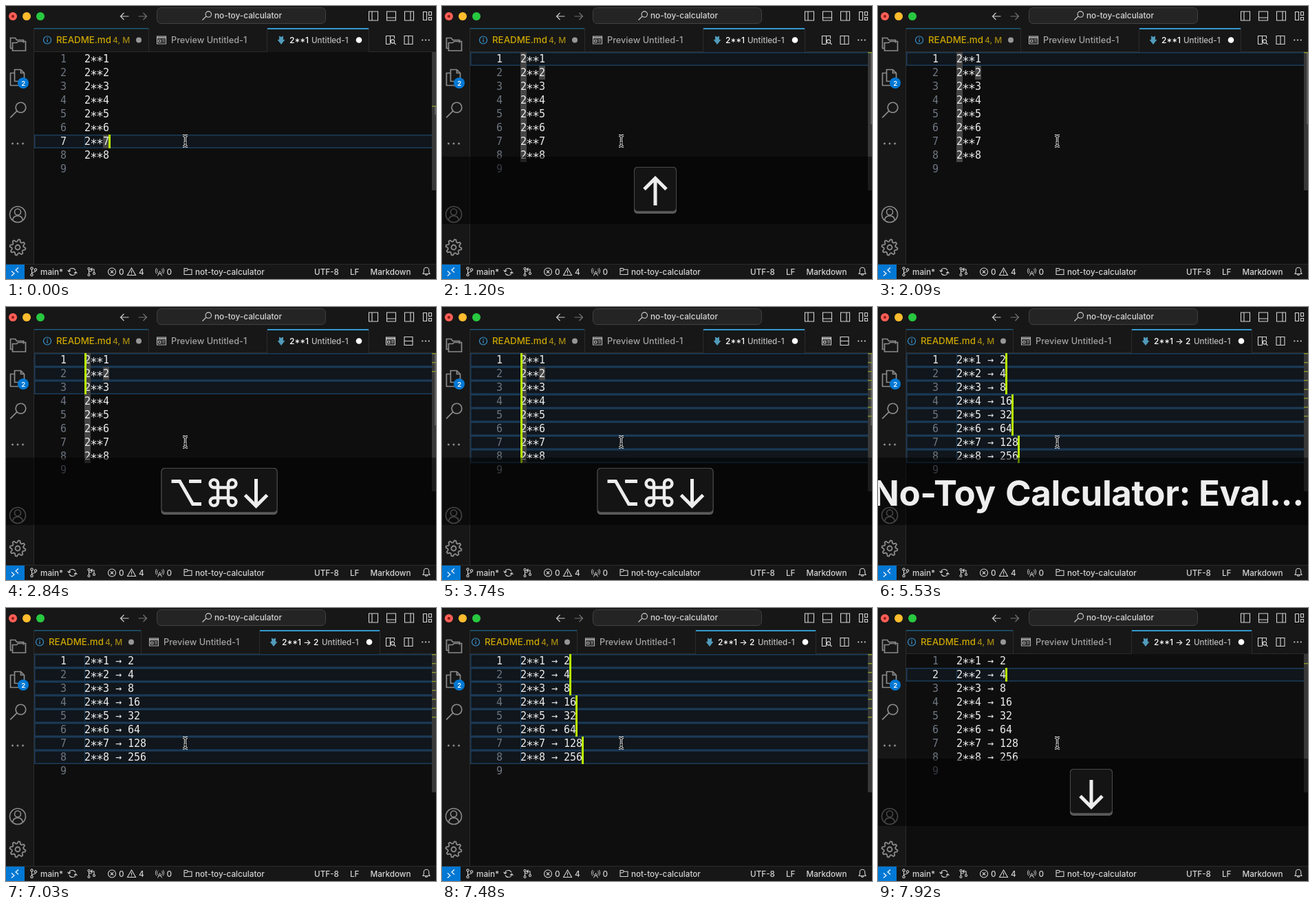
An HTML page with a canvas for the animation above (8 s loop, 625 px wide and 397 px high).

```html
<!DOCTYPE html>
<html lang="en">
<head>
<meta charset="utf-8">
<title>Editor</title>
<style>
html, body { margin: 0; width: 100%; height: 100%; overflow: hidden; background: #0e0e0e; }
canvas { display: block; width: 625px; height: 397px; }
</style>
</head>
<body>
<canvas id="stage" width="625" height="397"></canvas>
<script>
const ctx = document.getElementById('stage').getContext('2d');
const LOOP = 8000, TOP = 67, ROW = 20, LEFT = 114, CELL = 9;
const UI = 'Inter, "Noto Sans", sans-serif';
const MONO = '"DejaVu Sans Mono", "Noto Sans Mono", monospace';
const BAR = '#171717', EDITOR = '#0e0e0e', EDGE = '#2b2b2b', TEXT = '#d4d4d4', LIME = '#b9f500', BLUE = '#0078d4';
const LABEL = 'label';

// Each step changes part of the state: rows first..last hold carets.
const steps = [
  [0, { first: 7, last: 7, end: true, on: true, mark: 'last', key: '', alt: false, done: false }],
  [150, { on: false }],
  [450, { key: '↑', first: 6, last: 6, on: true, mark: '' }],
  [600, { first: 1, last: 1, end: false }],
  [900, { mark: 'twos' }],
  [1200, { on: false }],
  [1500, { key: '' }],
  [1640, { on: true }],
  [2090, { on: false }],
  [2540, { on: true, alt: true }],
  [2690, { key: '⌥⌘↓', last: 2 }],
  [2840, { last: 3 }],
  [2990, { last: 4 }],
  [3290, { last: 5 }],
  [3440, { last: 6 }],
  [3590, { last: 7 }],
  [3740, { last: 8 }],
  [4040, { alt: false }],
  [4190, { key: '⌘→', end: true, mark: '' }],
  [4630, { mark: 'first' }],
  [4930, { on: false }],
  [5380, { key: LABEL, on: true }],
  [5530, { done: true, mark: '' }],
  [6130, { on: false }],
  [6280, { key: '' }],
  [6580, { on: true }],
  [7030, { on: false }],
  [7480, { on: true }],
  [7630, { key: '⎋', last: 1 }],
  [7920, { key: '↓', first: 2, last: 2 }]
];

function stateAt(t) {
  const s = {};
  for (const [at, change] of steps) if (at <= t) Object.assign(s, change);
  return s;
}

function box(x, y, w, h, color) {
  ctx.fillStyle = color;
  ctx.fillRect(x, y, w, h);
}

function disc(x, y, r, color) {
  ctx.fillStyle = color;
  ctx.beginPath();
  ctx.arc(x, y, r, 0, 7);
  ctx.fill();
}

function panel(x, y, w, h, r, fill, line) {
  ctx.beginPath();
  ctx.roundRect(x, y, w, h, r);
  ctx.fillStyle = fill;
  ctx.fill();
  if (line) {
    ctx.strokeStyle = line;
    ctx.lineWidth = 1;
    ctx.stroke();
  }
}

function text(str, x, y, size, color = TEXT, weight = 450, family = UI) {
  ctx.font = `${weight} ${size}px ${family}`;
  ctx.fillStyle = color;
  ctx.fillText(str, x, y);
}

function icon(path, x = 0, y = 0, color = TEXT, width = 1.1) {
  ctx.save();
  ctx.translate(x, y);
  ctx.strokeStyle = color;
  ctx.lineWidth = width;
  ctx.stroke(new Path2D(path));
  ctx.restore();
}

const ring = r => `M${r} 0A${r} ${r} 0 1 1 ${-r} 0A${r} ${r} 0 1 1 ${r} 0Z`;
const frame = 'M-6.5 -6.5H6.5V6.5H-6.5Z';
const lens = r => `M${r} ${-r * .3}a${r * .65} ${r * .65} 0 1 1 ${-r * 1.3} 0a${r * .65} ${r * .65} 0 1 1 ${r * 1.3} 0M${-r * .14} ${r * .14}L${-r} ${r}`;
const folder = 'M-5.5 4.5V-4.5H-1.5L0 -2.8H5.5V4.5ZM-5.5 -1H-1.5L0 -2.8';
const preview = 'M-6.5 -5.5H6.5V5.5H-6.5ZM-6.5 -2.5H6.5M-6.5 -4H6.5M-4.5 0H-1V3H-4.5ZM1 0H5M1 2.5H5';

function dots(x, y, gap, r, color) {
  for (let i = -1; i <= 1; i++) disc(x + i * gap, y, r, color);
}

function titleBar() {
  box(0, 0, 625, 32, BAR);
  disc(10, 15, 6, '#ff5f57');
  disc(10, 15, 2, '#8c1a12');
  disc(30, 15, 6, '#febc2e');
  disc(50, 15, 6, '#28c840');
  const back = 'M6 0H-6M-1 -5L-6 0L-1 5', next = 'M-6 0H6M1 -5L6 0L1 5';
  icon(back, 172.5, 15, '#cccccc', 1.2);
  icon(next, 198.5, 15, '#747474', 1.2);
  panel(219.5, 2.5, 245, 23, 6, '#242424', '#424242');
  icon(lens(6.5), 292, 14);
  text('no-toy-calculator', 303, 18, 11.8);
  icon(frame + 'M-2 -6.5V6.5', 534, 14.5);
  icon(frame + 'M-6.5 2.5H6.5', 560, 14.5);
  icon(frame + 'M2 -6.5V6.5', 586, 14.5);
  icon('M-6 -6H-1V6H-6ZM2 -6H6V-1H2ZM2 2H6V6H2Z', 612.5, 14.5);
}

function tabs(s) {
  const shift = s.done ? -11 : 0;
  const active = 379 + shift, close = s.done ? 543 : 527;
  box(41, 32, 584, 35, BAR);
  box(41, 66, 584, 1, EDGE);
  box(active, 32, close - active, 35, BAR);
  box(active, 32, close - active, 2, '#3399cc');
  box(41, 32, 166 + shift, 1.5, '#1f5878');
  for (const x of [207 + shift, active, close]) box(x, 32, 1, 35, EDGE);

  ctx.save();
  ctx.translate(shift, 0);
  icon(ring(5.5), 60, 49.5, '#3794cf', 1.2);
  box(59.4, 48.5, 1.3, 4, '#3794cf');
  box(59.4, 46, 1.3, 1.4, '#3794cf');
  text('README.md', 73, 54, 13.3, '#cca700');
  text('4, M', 155, 54, 12, '#a58a10');
  disc(193, 49.5, 4, '#969696');
  icon(preview, 226, 49.5, '#b8b8b8');
  text('Preview Untitled-1', 240, 54, 12.7, '#a3a3a3');
  ctx.translate(active - 379 - shift, 0);
  ctx.fillStyle = '#519aba';
  ctx.fill(new Path2D('M397 43.5L400 45L403 43.5V49H405.5L400 56L394.5 49H397Z'));
  text(s.done ? '2**1 → 2' : '2**1', 412, 54, 12, '#ffffff', 500);
  ctx.restore();

  const tail = s.done ? 15 : 0;
  text('Untitled-1', 444 + tail, 54, 11.6, '#bcbcbc');
  disc(513 + tail, 49.5, 4.3, '#ffffff');

  if (s.alt) {
    icon(preview, 559, 49.5);
    icon('M-6 -6H6V6H-6ZM-6 0H6', 585, 49.5);
  } else {
    icon('M0 6H-6V-6H6V-2M0 -6V6', 558.5, 49.5);
    icon(ring(2.6) + 'M2 2L4.5 4.5', 562, 51.5);
    icon('M-6 -6H6V6H-6ZM0 -6V6', 585, 49.5);
  }
  dots(610, 49.5, 4.7, 1.1, TEXT);
}

function activityBar() {
  const grey = '#8b8b8b';
  box(0, 32, 41, 344, BAR);
  box(40, 32, 1, 344, EDGE);
  icon('M-8 6H-11V-9H-4L-2 -6H8V-2M-8 9.5V-2H-2L0 -4H11V9.5Z', 17.5, 55.5, grey, 1.7);
  icon('M-4 -11H5L10 -6V6H-4ZM5 -11V-6H10M-4 -6H-10V12H4V6', 16.5, 103.5, grey, 1.7);
  disc(25, 112, 8, BLUE);
  text('2', 22.3, 115.7, 9.5, '#ffffff', 600);
  icon(lens(11.3), 17.5, 151, grey, 1.7);
  dots(17, 200, 7.5, 1.5, grey);
  icon(ring(11.5), 17, 303, grey, 1.6);
  icon(ring(4.5), 17, 299.5, grey, 1.6);
  icon('M-7.5 8.5C-6 0 6 0 7.5 8.5', 17, 303, grey, 1.6);

  let gear = '';
  for (let i = 0; i < 32; i++) {
    const a = (i + .5) * Math.PI / 16, r = i % 4 < 2 ? 11.5 : 8.5;
    gear += `${i ? 'L' : 'M'}${r * Math.cos(a)} ${r * Math.sin(a)}`;
  }
  icon(gear + 'Z', 17, 351, grey, 1.8);
  icon(ring(3.5), 17, 351, grey, 1.8);
}

function statusBar() {
  box(0, 375, 625, 22, BAR);
  box(0, 375, 625, 1, EDGE);
  box(0, 376, 27, 21, BLUE);
  icon('M-5 -1L-1 2.5L-5 6M5 -6L1 -2.5L5 1', 13, 386.5, '#ffffff', 1.1);
  icon(ring(1.7), 37.5, 381.5);
  icon(ring(1.7), 37.5, 391);
  icon(ring(1.7), 43, 383.5);
  icon('M37.5 383V389.3M43 385C43 388 38 386 37.5 389');
  icon('M-5 -1A5 5 0 0 1 4.5 -2M5 1A5 5 0 0 1 -4.5 2M-7 -2.5L-5 0L-2.5 -2M7 2.5L5 0L2.5 2', 96.5, 386.5);
  for (const y of [382, 391]) icon(ring(1.5), 120.5, y);
  icon(ring(1.5), 128, 389);
  icon('M120.5 383.5V389.5M128 387.5V383H123M125.5 381L123 383L125.5 385M120.5 386H124.5');
  icon(ring(5.5) + 'M-2.2 -2.2L2.2 2.2M2.2 -2.2L-2.2 2.2', 154, 386.5);
  icon('M0 -5.5L6 5H-6ZM0 -2V2M0 3V4', 182.5, 386.5);
  icon('M0 -1L-3 6M0 -1L3 6M-2 3H2M-2.6 -4A3.5 3.5 0 0 0 -2.6 1.5M2.6 -4A3.5 3.5 0 0 1 2.6 1.5M-4.5 -5.5A6.5 6.5 0 0 0 -4.5 3M4.5 -5.5A6.5 6.5 0 0 1 4.5 3', 223.5, 386.5, TEXT, .9);
  icon(folder, 264.5, 386);
  const labels = [['main*', 50], ['0', 164], ['4', 193], ['0', 233.5], ['not-toy-calculator', 275],
    ['UTF-8', 448], ['LF', 500], ['Markdown', 529.5]];
  for (const [str, x] of labels) text(str, x, 390.5, 11.7);
  icon('M-5 3.5H5L3.7 1V-2A3.7 3.7 0 0 0 -3.7 -2V1ZM-1.5 4A1.5 1.5 0 0 0 1.5 4', 611, 386);
}

// Asterisks are large and sit at mid height, as in a coding font.
function codeLine(str, row) {
  const base = TOP + row * ROW - 5;
  [...str].forEach((c, i) => {
    const star = c === '*';
    text(c, LEFT + i * CELL - (star ? .7 : 0), base + (star ? 4 : 0), star ? 17.5 : 15, '#ececec', 400, MONO);
  });
}

function editor(s) {
  const has = row => row >= s.first && row <= s.last;
  const line = row => `2**${row}` + (s.done ? ` → ${2 ** row}` : '');
  box(41, 67, 584, 308, EDITOR);

  for (let row = 1; row <= 8; row++) {
    const y = TOP + (row - 1) * ROW;
    if (has(row)) {
      box(41, y, 584, ROW, '#10161b');
      ctx.strokeStyle = '#1b3a57';
      ctx.lineWidth = 1.6;
      ctx.strokeRect(41.8, y + .8, 590, ROW - 1.6);
      box(LEFT, y, 1, ROW, '#1b3a57');
    }
    const twos = s.mark === 'twos';
    if (twos) box(LEFT, y, CELL, ROW, '#454545');
    if (twos && row === 2 || s.mark === 'last' && row === 7 || s.mark === 'first' && row === 1)
      box(LEFT + 3 * CELL, y, CELL, ROW, '#454545');
  }

  for (let row = 1; row <= 9; row++) {
    const lead = row === s.first;
    text(row, 79, TOP + row * ROW - 5, 15, lead ? '#e6e6e6' : '#6e7681', 400, MONO);
    if (row > 8) continue;
    const str = line(row);
    codeLine(str, row);
    if (s.on && has(row))
      box(s.end ? LEFT + str.length * CELL - 1 : LEFT, TOP + (row - 1) * ROW, 3, ROW, LIME);
  }

  // Overview ruler
  box(619, 67, 6, 201, '#383838');
  if (s.mark === 'twos') box(623, 67, 2, 105, '#5c5c5c');
  if (s.mark === 'last') box(623, 146, 2, 12, '#5c5c5c');
  if (s.mark === 'first') box(623, 67, 2, 12, '#5c5c5c');
  for (let row = s.first; row <= s.last; row++) box(619, 67 + (row - 1) * 13, 6, 1.5, '#7f962c');
}

const arrow = 'M0 -20V19M-16 3.5L0 19.5L16 3.5';
const turn = { '↓': 0, '↑': Math.PI, '→': -Math.PI / 2 };
const advance = { '⌥': 55, '⌘': 52, '⎋': 52, '→': 52 };
const keyWidth = c => advance[c] || 44;

function symbol(c, x) {
  const color = '#ededed';
  ctx.save();
  ctx.translate(x, 270);
  if (c in turn) {
    ctx.rotate(turn[c]);
    icon(arrow, 0, 0, color, 5);
  } else if (c === '⌥') {
    icon('M-21.5 -16.5H-9.5L9.5 16.5H22M4 -16.5H22', 0, 0, color, 4.8);
  } else if (c === '⌘') {
    icon('M-7.5 -7.5H7.5V7.5H-7.5ZM-7.5 -7.5H-13A5.7 5.7 0 1 1 -7.5 -13ZM7.5 -7.5V-13A5.7 5.7 0 1 1 13 -7.5ZM7.5 7.5H13A5.7 5.7 0 1 1 7.5 13ZM-7.5 7.5V13A5.7 5.7 0 1 1 -13 7.5Z', 0, 0, color, 4.4);
  } else {
    icon('M-6 -16A17 17 0 1 1 -16 -6M0 0L-17 -17M-17 -7V-17H-7', 0, 0, color, 4.4);
  }
  ctx.restore();
}

function keyOverlay(key) {
  if (!key) return;
  box(0, 219, 625, 98, 'rgba(0,0,0,.5)');
  if (key === LABEL) {
    const words = [['No-Toy', -8], ['Calculator:', 185], ['Eval...', 466]];
    ctx.letterSpacing = '-0.4px';
    for (const [str, x] of words) text(str, x, 288.5, 51, '#eeeeee', 650);
    ctx.letterSpacing = '0px';
    return;
  }
  const keys = [...key];
  const w = keys.reduce((sum, c) => sum + keyWidth(c), 18);
  let x = 310 - w / 2;
  panel(x, 234, w, 68, 5, '#5a5a5a');
  panel(x + .5, 234.5, w - 1, 64, 5, '#141414', '#4a4a4a');
  x += 9;
  for (const c of keys) {
    symbol(c, x + keyWidth(c) / 2);
    x += keyWidth(c);
  }
}

function pointer() {
  const beam = 'M-3.5 -8C-1 -8 0 -7 0 -5.5C0 -7 1 -8 3.5 -8M0 -6V6M-3.5 8C-1 8 0 7 0 5.5C0 7 1 8 3.5 8M-2 2.5H2';
  icon(beam, 260.5, 196.3, '#ffffff', 3.2);
  icon(beam, 260.5, 196.3, '#000000', 1.3);
}

function draw(now) {
  const s = stateAt(now % LOOP);
  editor(s);
  titleBar();
  tabs(s);
  activityBar();
  statusBar();
  keyOverlay(s.key);
  pointer();
}

let start;
function tick(now) {
  start ??= now;
  draw(now - start);
  requestAnimationFrame(tick);
}
draw(0);
requestAnimationFrame(tick);
</script>
</body>
</html>
```
